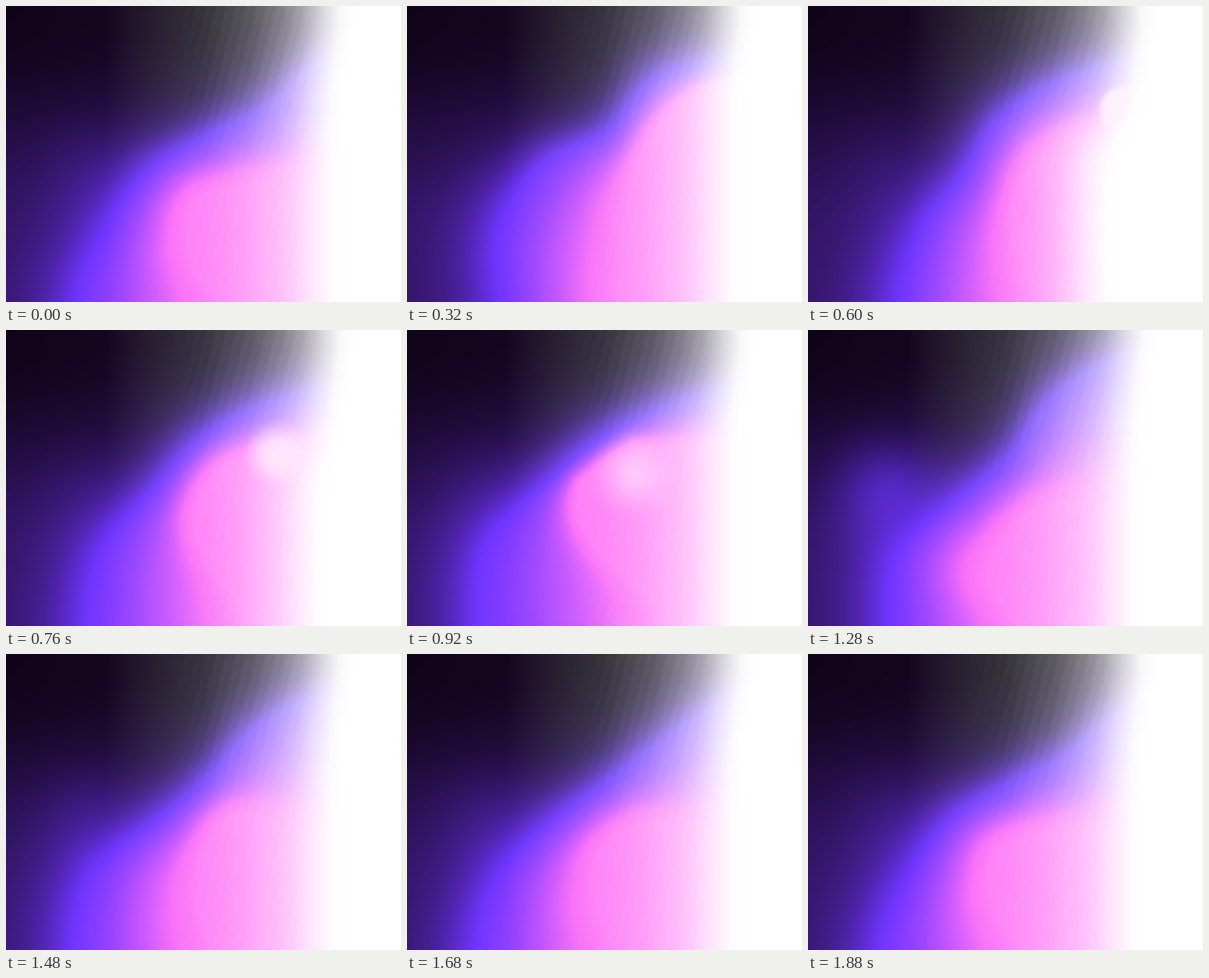
Recreate the animation shown at these times as an HTML page with a canvas. Size 400x300 px, loop 1920 ms.

```html
<!DOCTYPE html>
<html lang="en">
<head>
<meta charset="utf-8">
<title>Violet glow</title>
<style>
html, body { margin: 0; width: 100%; height: 100%; overflow: hidden; background: #10041a; }
canvas { display: block; width: 400px; height: 300px; }
</style>
</head>
<body>
<canvas id="stage" width="200" height="150"></canvas>
<script>
const W = 200, H = 150, SCALE = 2, LOOP = 1920, STEP = 40;
const ctx = document.getElementById('stage').getContext('2d');
const img = ctx.createImageData(W, H);

// Glow outline around (330, 300): radii every 18 degrees from left to up.
const CX = 330, CY = 300;
const poses = [
  { at: 0,    violet: [256, 240, 228, 209, 208, 245], pink: [150, 174, 186, 162, 146, 146], push: 0,  cloud: 0.2 },
  { at: 320,  violet: [235, 247, 238, 215, 240, 242], pink: [145, 150, 163, 180, 210, 228], push: 0,  cloud: 0 },
  { at: 600,  violet: [237, 228, 216, 230, 235, 240], pink: [138, 150, 168, 188, 190, 195], push: 28, cloud: 0.15 },
  { at: 920,  violet: [258, 262, 239, 232, 231, 236], pink: [115, 135, 205, 220, 200, 195], push: 0,  cloud: 0.2 },
  { at: 1280, violet: [247, 250, 220, 213, 248, 272], pink: [150, 180, 174, 166, 158, 152], push: 0,  cloud: 1 },
  { at: 1480, violet: [262, 255, 221, 214, 238, 258], pink: [158, 170, 178, 180, 156, 144], push: 0,  cloud: 0.35 }
];
poses.push({ ...poses[0], at: 1900 });

// The pale spot that drifts in from the right and dissolves.
const spots = [
  { at: 440,  x: 360, y: 88,  r: 22, soft: 4,  a: 1 },
  { at: 600,  x: 319, y: 105, r: 23, soft: 4,  a: 0.9 },
  { at: 920,  x: 230, y: 146, r: 22, soft: 28, a: 0.58 },
  { at: 1120, x: 200, y: 190, r: 20, soft: 34, a: 0 }
];

const greyStops = [[0, 0], [100, 2], [150, 28], [200, 50], [250, 88], [280, 127],
  [300, 163], [320, 212], [338, 248], [350, 255]];
const ramp = [[-0.35, 255, 116, 246], [0, 248, 100, 246], [0.3, 198, 78, 255],
  [0.6, 150, 64, 255], [1, 102, 50, 255]];

const clamp = (v, lo, hi) => Math.max(lo, Math.min(hi, v));
const mix = (a, b, k) => a + (b - a) * k;
const smooth = k => { k = clamp(k, 0, 1); return k * k * (3 - 2 * k); };
const screen = (a, b) => 255 - (255 - a) * (255 - b) / 255;

function lookup(stops, x, col) {
  if (x <= stops[0][0]) return stops[0][col];
  for (let i = 1; i < stops.length; i++) {
    const a = stops[i - 1], b = stops[i];
    if (x <= b[0]) return mix(a[col], b[col], (x - a[0]) / (b[0] - a[0]));
  }
  return stops[stops.length - 1][col];
}

function span(keys, t) {
  let i = 0;
  while (i < keys.length - 2 && t >= keys[i + 1].at) i++;
  const a = keys[i], b = keys[i + 1];
  return [a, b, clamp((t - a.at) / (b.at - a.at), 0, 1)];
}

// Catmull-Rom through the radii, one value per half degree.
function outline(radii) {
  const get = i => radii[clamp(i, 0, radii.length - 1)];
  return Float32Array.from({ length: 181 }, (_, n) => {
    const i = Math.min(4, Math.floor(n / 36)), k = n / 36 - i;
    const a = get(i - 1), b = get(i), c = get(i + 1), d = get(i + 2);
    return b + 0.5 * k * (c - a + k * (2 * a - 5 * b + 4 * c - d + k * (3 * (b - c) + d - a)));
  });
}

const greyLut = Float32Array.from({ length: 460 }, (_, x) => lookup(greyStops, x, 1));
const rampLut = Array.from({ length: 136 }, (_, i) =>
  [1, 2, 3].map(c => lookup(ramp, i / 100 - 0.35, c)));

const cells = [];
for (let j = 0; j < H; j++) {
  for (let i = 0; i < W; i++) {
    const x = i * SCALE + 1, y = j * SCALE + 1;
    const dx = CX - x, dy = CY - y;
    const deg = clamp(Math.atan2(dy, dx) * 180 / Math.PI, 0, 90);
    cells.push({
      x, y,
      r: Math.hypot(dx, dy),
      n: Math.round(deg * 2),
      width: mix(40, 24, smooth(deg / 50)),
      lean: 10 * smooth(y / 110),
      low: 1 - 0.45 * smooth((y - 60) / 140) * smooth((270 - x) / 120),
      haze: smooth(1.15 - x / 300) * smooth((y - 20) / 210),
      cloud: Math.exp(-((x - 82) ** 2 + (y - 165) ** 2) / 2600),
      ripple: 2.5 * Math.sin((x + 0.25 * y) * 0.62) * smooth((x - 150) / 60) * smooth((320 - x) / 30)
    });
  }
}

function draw(t) {
  const [a, b, k] = span(poses, t);
  const blend = name => outline(a[name].map((v, i) => mix(v, b[name][i], k)));
  const violet = blend('violet'), pink = blend('pink');
  const push = mix(a.push, b.push, k), cloud = mix(a.cloud, b.cloud, k);

  let spot = null;
  if (t >= spots[0].at && t < spots[3].at) {
    const [p, q, m] = span(spots, t);
    spot = {};
    for (const key of ['x', 'y', 'r', 'soft', 'a']) spot[key] = mix(p[key], q[key], m);
  }

  cells.forEach((c, i) => {
    const lean = c.lean + push * smooth((c.y - 90) / 80);
    const grey = greyLut[Math.floor(c.x + lean * smooth((c.x - 180) / 100))] * c.low + c.ripple;

    const outer = violet[c.n], inner = Math.min(pink[c.n], outer - 18);
    const u = clamp((c.r - inner) / (outer - inner), -0.35, 1);
    const rgb = rampLut[Math.round((u + 0.35) * 100)];
    const e = Math.max(0, c.r - outer) / c.width;
    const glow = 0.72 * Math.exp(-Math.pow(e, 1.3)) + 0.28 * Math.exp(-e / 2.5);
    const extra = c.haze * (1 - glow);
    const puff = c.cloud * cloud * (1 - glow);

    // The dark violet tint of the backdrop fades out as the grey rises.
    const tint = 1 - smooth(grey / 60);
    let red = screen(rgb[0] * glow + 30 * extra + 44 * puff, 16 * tint + grey);
    let green = screen(rgb[1] * glow + 15 * extra + 22 * puff, 3 * tint + grey);
    let blue = screen(rgb[2] * glow + 66 * extra + 125 * puff, 24 * tint + grey);

    if (spot) {
      const d = Math.hypot(c.x - spot.x, c.y - spot.y);
      const s = spot.a * smooth((spot.r + spot.soft - d) / (2 * spot.soft));
      red = mix(red, 255, s);
      green = Math.max(green, mix(green, 242, s));
      blue = Math.max(blue, mix(blue, 253, s));
    }
    img.data.set([red, green, blue, 255], i * 4);
  });
  ctx.putImageData(img, 0, 0);
}

const start = performance.now();
let shown = -1;
function tick() {
  const t = Math.floor(((performance.now() - start) % LOOP) / STEP) * STEP;
  if (t !== shown) draw(shown = t);
  requestAnimationFrame(tick);
}
tick();
</script>
</body>
</html>
```
